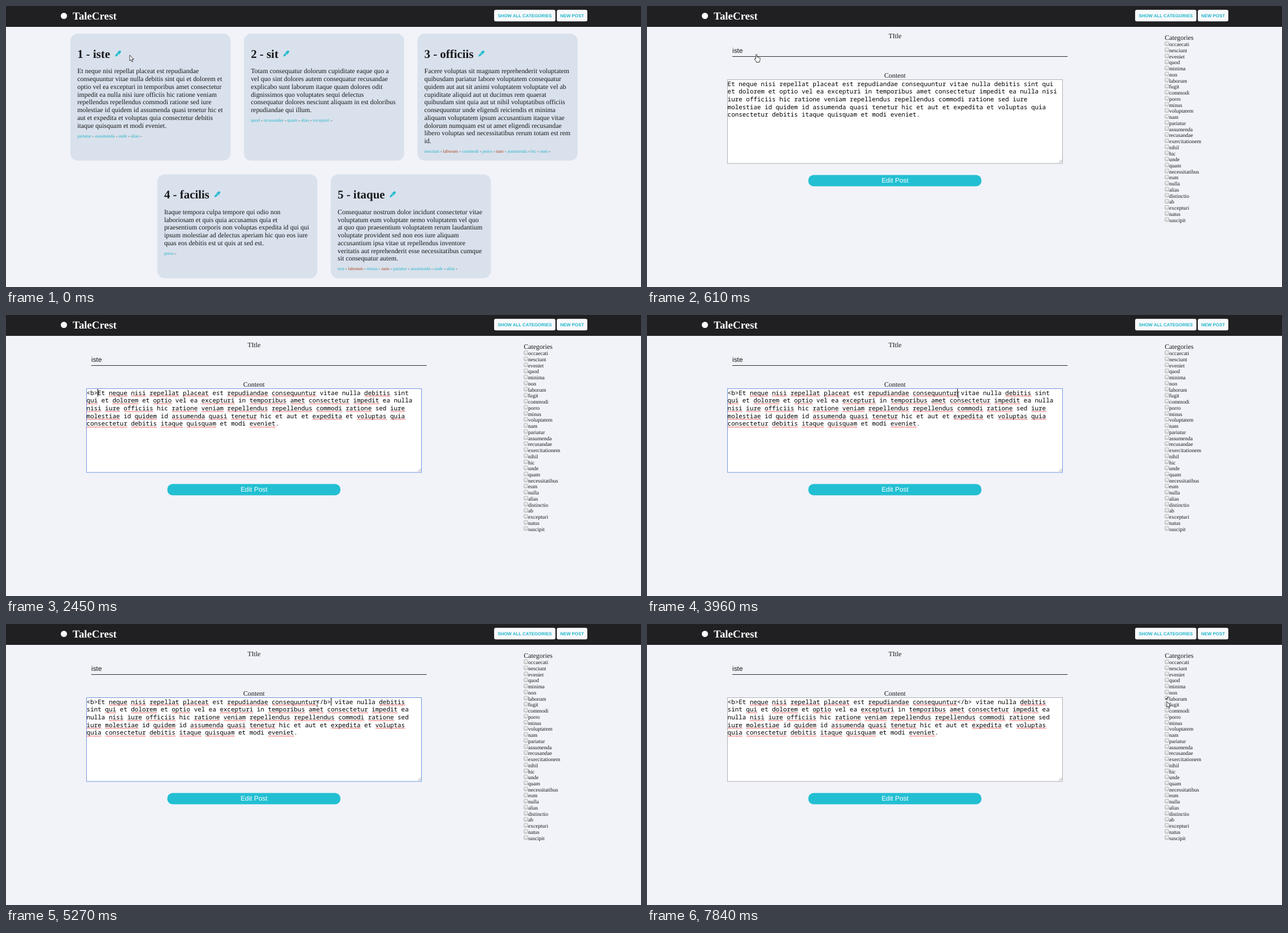
Animation, 1124 px wide and 498 px high, one loop 7990 ms. Source, as an HTML page:

```html
<!DOCTYPE html>
<html lang="en">
<head>
<meta charset="utf-8">
<title>Blog editor</title>
<style>
html, body { margin: 0; width: 100%; height: 100%; overflow: hidden; background: #f1f3f9; }
svg { display: block; width: 1124px; height: 498px; text-rendering: geometricPrecision; }
text { font: 11.93px "Liberation Serif", serif; fill: #17181a; white-space: pre; }
.brand { font-size: 18.95px; font-weight: bold; fill: #fff; }
.head { font-size: 20.9px; font-weight: bold; }
.tag { font-size: 7.95px; }
.nav { font: bold 7.9px "Liberation Sans", sans-serif; fill: #20b6cb; }
.sans { font-family: "Liberation Sans", sans-serif; }
.cat { font-size: 9.56px; }
.mono { font: 10.93px "Noto Sans Mono", monospace; fill: #000; }
.mid { text-anchor: middle; }
</style>
</head>
<body>
<svg id="stage" viewBox="0 0 1124 498">
  <defs>
    <linearGradient id="box" x2="0" y2="1"><stop stop-color="#f3f3f3"/><stop offset="1" stop-color="#d9d9d9"/></linearGradient>
  </defs>
  <rect width="1124" height="498" fill="#f1f3f9"/>
  <rect width="1124" height="37" fill="#202022"/>
  <circle cx="102.5" cy="17.5" r="5.5" fill="#fff"/>
  <text class="brand" x="118" y="23.6">TaleCrest</text>
  <rect x="864" y="6.7" width="108.5" height="20.6" rx="3" fill="#f8f9fb"/>
  <rect x="975" y="6.7" width="54" height="20.6" rx="3" fill="#f8f9fb"/>
  <text class="nav mid" x="918.2" y="19.7">SHOW ALL CATEGORIES</text>
  <text class="nav mid" x="1002" y="19.7">NEW POST</text>
  <g id="list"></g>
  <g id="form">
    <text class="mid" x="439" y="57">TItle</text>
    <text class="sans" x="151" y="83">iste</text>
    <path d="M151 89.5H744.5" stroke="#2b2b2d"/>
    <text class="mid" x="439" y="127.3">Content</text>
    <rect id="area" x="142.5" y="130.5" width="593" height="148.5" fill="#fff"/>
    <path d="M729.5 277.5l5-5M732.5 277.5l2-2" stroke="#777" stroke-width=".8"/>
    <g id="words"></g>
    <path id="caret" stroke="#000"/>
    <rect x="285.5" y="299.5" width="306.5" height="20" rx="9.5" fill="#22bfd2"/>
    <text class="sans mid" x="439" y="313.4" style="fill:#fff">Edit Post</text>
    <text x="916.5" y="60">Categories</text>
    <g id="cats"></g>
    <path id="check" d="M918 131.6l1.6 1.8 3-4.2" fill="none" stroke="#333" stroke-width="1.4"/>
  </g>
  <circle id="click" r="9" fill="#f4f000" fill-opacity=".55"/>
  <g id="cursor">
    <path d="M0 0V10.2L2.3 8 3.9 11.8 5.6 11.1 4 7.4H7.2Z" fill="#fff" stroke="#222" stroke-width=".9"/>
    <path d="M-.9 8.4V1.2a1.1 1.1 0 0 1 2.2 0V5q1-.6 1.9.4 1.1-.5 1.8.5 1.6-.3 1.6 1.3V10q0 1.4-.9 2.4V14H-.3V12.6L-3.2 8.8q-.3-1.4 1-1.4Z" fill="#fff" stroke="#222" stroke-width=".9"/>
    <path d="M-2-5Q0-5 0-4Q0-5 2-5M0-4V4M-2 5Q0 5 0 4Q0 5 2 5" fill="none" stroke="#333" stroke-width=".9"/>
  </g>
</svg>
<script>
const LOOP = 7990, LINE = 13.73, CHAR = 6.56, LEFT = 142.6, COLS = 90;
const $ = id => document.getElementById(id);
const show = (el, on) => el.setAttribute('display', on ? 'inline' : 'none');
const text = (cls, x, y, s) => `<text class="${cls}" x="${x}" y="${y}">${s}</text>`;
const escape = s => s.replace(/</g, '&lt;').replace(/>/g, '&gt;');

// x, y, height, icon offset, title, lines, tags
const cards = [
  [114, 49, 225, 66.5, '1 - iste', 'Et neque nisi repellat placeat est repudiandae|consequuntur vitae nulla debitis sint qui et dolorem et|optio vel ea excepturi in temporibus amet consectetur|impedit ea nulla nisi iure officiis hic ratione veniam|repellendus repellendus commodi ratione sed iure|molestiae id quidem id assumenda quasi tenetur hic et|aut et expedita et voluptas quia consectetur debitis|itaque quisquam et modi eveniet.', 'pariatur assumenda unde alias'],
  [421.2, 49, 225, 57, '2 - sit', 'Totam consequatur dolorum cupiditate eaque quo a|vel quo sint dolores autem consequatur recusandae|explicabo sunt laborum itaque quam dolores odit|dignissimos quo voluptates sequi delectus|consequatur dolores nesciunt aliquam in est doloribus|repudiandae qui illum.', 'quod recusandae quam alias excepturi'],
  [728.3, 49, 225, 95.5, '3 - officiis', 'Facere voluptas sit magnam reprehenderit voluptatem|quibusdam pariatur labore voluptatem consequatur|quidem aut aut sit animi voluptatem voluptate vel ab|cupiditate aliquid aut ut ducimus rem quaerat|quibusdam sint quia aut ut nihil voluptatibus officiis|consequuntur unde eligendi reiciendis et minima|aliquam voluptatem ipsum accusantium itaque vitae|dolorum numquam est ut amet eligendi recusandae|libero voluptas sed necessitatibus rerum totam est rem|id.', 'nesciunt laborum commodi porro nam assumenda hic eum'],
  [267.7, 298.5, 184, 88.5, '4 - facilis', 'Itaque tempora culpa tempore qui odio non|laboriosam et quis quia accusamus quia et|praesentium corporis non voluptas expedita id qui qui|ipsum molestiae ad delectus aperiam hic quo eos iure|quas eos debitis est ut quis at sed est.', 'porro'],
  [574.8, 298.5, 184, 92, '5 - itaque', 'Consequatur nostrum dolor incidunt consectetur vitae|voluptatum eum voluptate nemo voluptatem vel quo|at quo quo praesentium voluptatem rerum laudantium|voluptate provident sed non eos iure aliquam|accusantium ipsa vitae ut repellendus inventore|veritatis aut reprehenderit esse necessitatibus cumque|sit consequatur autem.', 'non laborum minus nam pariatur assumenda unde alias']
];
const dropper = 'M10.3.6a2 2 0 0 0-2.9 0L5.6 2.4 5 1.8 3.9 2.9 8 7l1.1-1.1-.6-.6 1.8-1.8a2 2 0 0 0 0-2.9zM4.3 4.3 1 7.6.9 9.2 0 10.4.5 11l1.2-.9 1.6-.1 3.3-3.3z';
const tagColor = tag => /^(laborum|nam)$/.test(tag) ? '#a8471c' : '#25b5cb';

$('list').innerHTML = cards.map(([x, y, h, icon, title, body, tags]) => {
  const lines = body.split('|'), tx = x + 12.2, base = y + 70.4;
  const links = tags.split(' ').map(tag => `<tspan fill="${tagColor(tag)}">${tag}</tspan> -`).join(' ');
  return `<rect x="${x}" y="${y}" width="283.5" height="${h}" rx="13" fill="#d9e1ec"/>`
    + text('head', tx, y + 42.5, title)
    + `<path d="${dropper}" transform="translate(${tx + icon} ${y + 30})" fill="#22bbd0"/>`
    + lines.map((s, i) => text('', tx, base + i * LINE, s)).join('')
    + text('tag', tx, base + (lines.length - 1) * LINE + 17.1, links);
}).join('');

const cats = 'occaecati nesciunt eveniet quod minima non laborum fugit commodi porro minus voluptatem nam pariatur assumenda recusandae exercitationem nihil hic unde quam necessitatibus eum nulla alias distinctio ab excepturi natus suscipit';
$('cats').innerHTML = cats.split(' ').map((name, i) => {
  const y = 71.2 + i * 10.74;
  return `<rect x="916.9" y="${y - 7.6}" width="6.6" height="6.6" rx="1" fill="url(#box)" stroke="#a3a3a3" stroke-width=".8"/>` + text('cat', 924.2, y, name);
}).join('');

const story = cards[0][5].replace(/\|/g, ' ');
const split = story.indexOf(' vitae');
const known = /^(et|est|vitae|nulla|sint|vel|ea|in|id|hic|aut|sed|modi|b)$/i;

function wrap(s) {
  const rows = [''];
  for (const word of s.split(' ')) {
    const last = rows.length - 1, next = rows[last] ? rows[last] + ' ' + word : word;
    if (next.length > COLS) rows.push(word); else rows[last] = next;
  }
  return rows;
}

function squiggles(row, y) {
  return [...row.matchAll(/[a-z]+/gi)].filter(m => !known.test(m[0])).map(m =>
    `M${LEFT + m.index * CHAR} ${y}` + 'l1.093 1.1 1.093-1.1'.repeat(m[0].length * 3)).join('');
}

let drawn = '';
function drawWords(s, spelled) {
  if (drawn === s + spelled) return;
  drawn = s + spelled;
  $('words').innerHTML = wrap(s).map((row, i) => {
    const y = 141.5 + i * LINE;
    const marks = spelled ? `<path d="${squiggles(row, y + 1.6)}" fill="none" stroke="#f22" stroke-width=".8"/>` : '';
    return marks + text('mono', LEFT, y, escape(row));
  }).join('');
}

// first step, last step, steps, end x, end y
const moves = [
  [70, 230, 3, 193.5, 85.5], [690, 930, 4, 225, 146], [1090, 1390, 5, 155, 136],
  [1540, 1700, 3, 145.5, 135], [3410, 3710, 5, 551, 141], [6050, 6290, 4, 840, 157],
  [6370, 6370, 1, 863, 144], [6520, 6600, 2, 892, 144], [6750, 6830, 2, 902, 143],
  [6907, 7210, 5, 916, 138], [7450, 7450, 1, 918, 135], [7680, 7840, 3, 920, 137.5]
];
function pointer(t) {
  let x = 219, y = 87;
  for (const [from, to, n, ex, ey] of moves) {
    if (t < from) break;
    const gap = (to - from) / (n - 1) || 1;
    const f = Math.min(n, Math.floor((t - from) / gap + 1.001)) / n;
    x += (ex - x) * f;
    y += (ey - y) * f;
  }
  return [x, y];
}

const within = (t, spans) => spans.some(([a, b]) => t >= a && t < b);
const typed = (s, t, times) => s.slice(0, times.filter(k => t >= k).length);

function draw(t) {
  const edit = t >= 610, focus = within(t, [[1840, 7530]]);
  show($('list'), !edit);
  show($('form'), edit);

  const open = typed('<b>', t, [1920, 2070, 2450]);
  const close = typed('</b>', t, [4570, 4890, 5040, 5270]);
  drawWords(open + story.slice(0, split) + close + story.slice(split), t >= 1840);
  $('area').setAttribute('stroke', focus ? '#7396dc' : '#b0b0b0');

  const col = open.length + (t < 3910 ? 0 : split + close.length);
  $('caret').setAttribute('d', `M${Math.floor(LEFT + col * CHAR) + .5} 131V144.5`);
  show($('caret'), focus && !within(t, [[3010, 3540], [4420, 4570], [5820, 6370], [6907, 7440]]));
  show($('check'), t >= 7600);

  const [x, y] = pointer(t);
  const kind = t < 690 ? +(x < 203) : x < 737 && y > 129 ? 2 : 0;
  [...$('cursor').children].forEach((el, i) => show(el, i === kind));
  $('cursor').setAttribute('transform', `translate(${x} ${y})`);
  show($('cursor'), !within(t, [[1920, 3410]]));
  $('click').setAttribute('transform', `translate(${x} ${y})`);
  show($('click'), within(t, [[1840, 1920], [3910, 3960], [7530, 7600]]));
}

const start = performance.now();
function tick() {
  draw((performance.now() - start) % LOOP);
  requestAnimationFrame(tick);
}
tick();
</script>
</body>
</html>
```
